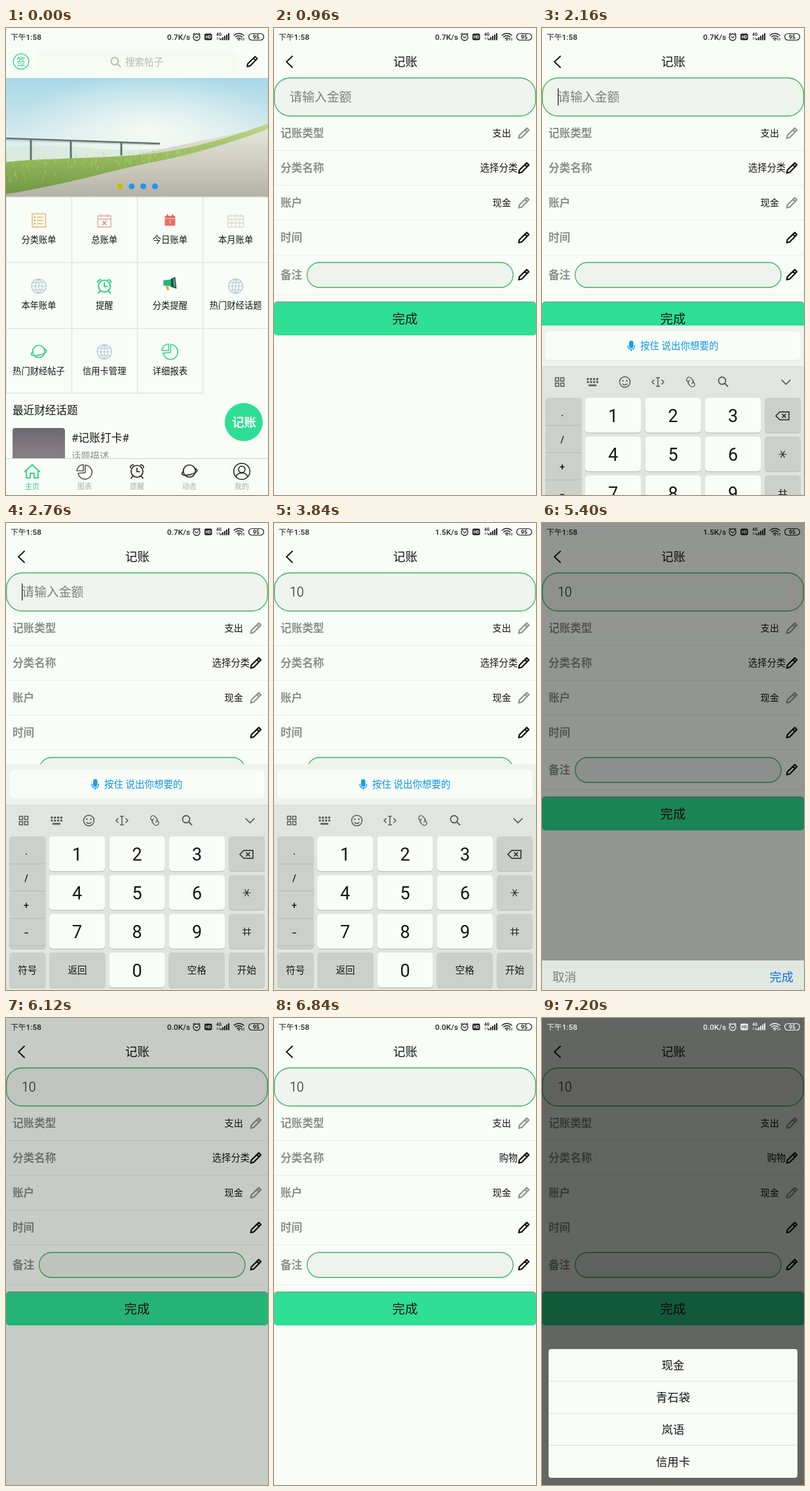
An HTML page that plays this animation: 400x711 px, repeating every 8 s.

```html
<!DOCTYPE html>
<html lang="zh">
<head>
<meta charset="utf-8">
<style>
html, body { margin: 0; width: 100%; height: 100%; overflow: hidden; background: #f8fdf7; }
svg { display: block; font-family: Roboto, "Noto Sans CJK SC", "Noto Sans CJK", sans-serif; }
</style>
</head>
<body>
<svg id="stage" width="400" height="711" viewBox="0 0 400 711"></svg>
<script>
const BG = '#f8fdf7', GREEN = '#2edf94', INK = '#141614', MINT = '#2fd08c';

// --- drawing helpers; text is placed by its vertical middle ---
const text = (s, x, cy, size, fill = INK, anchor = 'middle', extra = '') =>
  `<text x="${x}" y="${cy + size * 0.37}" font-size="${size}" fill="${fill}" text-anchor="${anchor}" ${extra}>${s}</text>`;
const rect = (x, y, w, h, fill, r = 0, extra = '') =>
  `<rect x="${x}" y="${y}" width="${w}" height="${h}" rx="${r}" fill="${fill}" ${extra}/>`;
const line = (d, color, w = 1.5, extra = '') =>
  `<path d="${d}" fill="none" stroke="${color}" stroke-width="${w}" ${extra}/>`;
const disc = (x, y, r, fill, extra = '') => `<circle cx="${x}" cy="${y}" r="${r}" fill="${fill}" ${extra}/>`;
const ring = (x, y, r, color, w = 1.5) => disc(x, y, r, 'none', `stroke="${color}" stroke-width="${w}"`);
const at = (x, y, body, more = '') => `<g transform="translate(${x} ${y}) ${more}">${body}</g>`;
const range = n => [...Array(n).keys()];
const BOLD = 'font-weight="700"', MEDIUM = 'font-weight="500"';

// --- icons, each around its own centre ---
const pencil = (x, y, color, w = 1.8) => at(x, y,
  line('M-7.8 7.8L-6.8 3.2L4.4-7.6L7.6-4.4L-3.4 6.8ZM1.6-4.9L4.8-1.7', color, w, 'stroke-linejoin="round"'));
const globe = (x, y) => at(x, y, ring(0, 0, 11, '#a9c6de', 1.2) +
  line('M-11 0H11M-9.5-5.5H9.5M-9.5 5.5H9.5', '#c6c8bd', 1.1) +
  line('M0-11V11M0-11C-7-6-7 6 0 11C7 6 7-6 0-11', '#a9c6de', 1.1));
const alarm = (x, y, color, w = 2) => at(x, y, ring(0, 0, 9, color, w) +
  line('M0-5V0.5H4M-6.5 7.5L-9 10.5M6.5 7.5L9 10.5M-10-5.5Q-10.5-9.5-5.5-9.8M10-5.5Q10.5-9.5 5.5-9.8', color, w, 'stroke-linecap="round"'));
const planet = (x, y, color) => at(x, y, ring(0, -0.5, 9.3, color, 1.6) +
  line('M-9-2.5C-16 2.5-9 5 0 5S16 2.5 9-2.5', color, 1.6, 'stroke-linecap="round" transform="rotate(-14)"'));
const pie = (x, y, color, k = 1) => at(x, y,
  line('M1-11A11.3 11.3 0 1 1-10.5 2L1 1ZM-2-12V-2H-12.5A11 11 0 0 1-2-12Z', color, 1.5, 'stroke-linejoin="round"'), `scale(${k})`);
const search = (x, y, color, w = 1.8) => at(x, y,
  ring(-1, -1, 5.5, color, w) + line('M3 3L7.5 7.5', color, w, 'stroke-linecap="round"'));

const gridIcons = [
  (x, y) => at(x, y, line('M-10-10H10.5V10H-10Z', '#f1b768') +
    line('M-3-5H7M-3 0H7M-3 5H7', '#f1b768', 1.4) + line('M-7-5H-5M-7 0H-5M-7 5H-5', '#ee8c55', 2)),
  (x, y) => at(x, y, line('M-10-7H10V10H-10ZM-10-2H10M-5-10V-5M5-10V-5', '#e5a9a0', 1.3) +
    line('M-3 1L3 7M3 1L-3 7', '#dd7f76', 1.3)),
  (x, y) => at(x, y, rect(-8, -7, 16, 15, '#e86f66', 1.5) + line('M-8-3H8', '#f8d8d2', 1) +
    line('M-4-9V-5M4-9V-5', '#d8584f', 2) + text('1', 0, 2.5, 8, '#fff')),
  (x, y) => at(x, y, line('M-12-7H12V10H-12ZM-12-2H12M-12 4H12M-6-2V10M0-2V10M6-2V10M-8-10V-5M0-10V-5M8-10V-5', '#ddd8cf', 1.3)),
  globe,
  (x, y) => alarm(x, y, MINT),
  (x, y) => at(x, y, '<path d="M-9-6L2-7V3L-9 2Z" fill="#22b47d"/><path d="M2-8L9-11L11 7L2 4Z" fill="#2c4c48"/><path d="M-6 2L-2 3L0 9H-4Z" fill="#e0ad3c"/>' +
    line('M7-8L8 4', '#2fd08c', 2), 'translate(-1 -3)'),
  globe,
  (x, y) => planet(x, y, MINT),
  globe,
  (x, y) => pie(x, y, MINT)
];
const gridLabels = '分类账单 总账单 今日账单 本月账单 本年账单 提醒 分类提醒 热门财经话题 热门财经帖子 信用卡管理 详细报表'.split(' ');

function banner() {
  let seed = 7;
  const rnd = () => (seed = seed * 16807 % 2147483647) / 2147483647;
  const blades = range(160).map(() => {
    const x = rnd() * 300, y = 204 - x * 0.06 + rnd() * (38 - x * 0.1);
    return `M${x.toFixed(1)} ${y.toFixed(1)}l${(rnd() * 4 - 2).toFixed(1)} ${(-3 - rnd() * 5).toFixed(1)}`;
  }).join('');
  return `<g clip-path="url(#photo)">` + rect(0, 76, 400, 181, 'url(#sky)') + rect(0, 76, 400, 181, 'url(#glow)') +
    '<path d="M0 182Q60 176 130 183T300 178V210H0Z" fill="#d3e6d8" opacity=".6"/>' +
    '<path d="M0 257V235L400 150V257Z" fill="url(#road)"/>' +
    line('M0 168L235 176', '#5f726e', 2.4) + line('M0 171L235 178', '#a8b9b2', 1) +
    line('M38 169V203M99 171V200M176 174V194', '#5f726e', 3) +
    '<path d="M0 204C60 198 130 199 205 193S340 166 400 146V154C350 172 296 190 230 203S90 239 0 253Z" fill="url(#grass)"/>' +
    line(blades, '#b5d377', 1, 'opacity=".6"') +
    '</g>' + range(4).map(i => disc(174 + i * 17.8, 241, 4.5, i ? '#2196f3' : '#c9b80c')).join('');
}

function home() {
  const cells = gridLabels.map((label, i) => {
    const x = 50 + i % 4 * 100.2, y = 257 + Math.floor(i / 4) * 100;
    return gridIcons[i](x, y + 36) + text(label, x, y + 65, 13.3);
  }).join('');
  const tabs = ['主页', '图表', '提醒', '动态', '我的'].map((s, i) =>
    text(s, 40 + i * 80, 698, 11, i ? '#a9ada8' : MINT)).join('');
  return rect(0, 0, 400, 711, BG) +
    ring(23, 51, 11.7, MINT, 1.3) + text('签', 23, 51, 14, MINT) +
    rect(47, 36, 305, 31, '#f7faf1', 3) + search(167, 51.5, '#b9bcb6', 2) + text('搜索帖子', 211, 52, 14.4, '#b6bab4') +
    pencil(376, 51, '#111', 2) + banner() +
    line('M0 257.5H400M0 357H400M0 457.5H400M0 556H301M100.5 257V556M200.5 257V556M300.5 257V556M.5 257V556', '#dfe6e4', 1.5) +
    cells + text('最近财经话题', 10, 582, 16.6, INK, 'start') +
    rect(10, 609, 80, 70, 'url(#thumb)', 4) + text('#记账打卡#', 100, 624, 16.8, INK, 'start') +
    text('话题描述', 100, 652, 14.3, '#8e928d', 'start') +
    `<g id="fab">${disc(363, 600, 29, '#2ede94')}${text('记账', 363.5, 600, 18.6, '#f8fdf7', 'middle', BOLD)}</g>` +
    rect(0, 656, 400, 55, BG) + line('M0 655.5H400', '#cfd4cf', 1) +
    line('M28 676L40 665L52 676M31 674V685H37V678H43V685H49V674', MINT, 1.8, 'stroke-linejoin="round"') +
    pie(120, 676, '#444', 0.95) + alarm(200, 675, '#222', 1.7) + planet(280, 675, '#222') +
    ring(360, 675, 12.3, '#222') + ring(360, 672, 5, '#222') + line('M351 683Q353 677.5 360 677.5T369 683', '#222') + tabs;
}

function record() {
  const labels = ['记账类型', '分类名称', '账户', '时间', '备注'];
  const rowY = [160, 213, 266, 319, 375.5];
  const rows = labels.map((s, i) => text(s, 10, rowY[i], 16.6, '#8b908a', 'start', BOLD) +
    pencil(381.5, rowY[i], i % 2 || i == 4 ? '#111' : '#8f948e', 2.2)).join('');
  const box = 'stroke="#3cb562" stroke-width="1.3"';
  return rect(0, 0, 400, 711, BG) + line('M28.5 42.5L19 51.5L28.5 60.5', '#111', 1.8) +
    text('记账', 200.5, 51, 18.6, INK, 'middle', MEDIUM) +
    rect(0.6, 76, 398.8, 58, '#f0f4ee', 24, box) +
    text('请输入金额', 24, 105, 18.9, '#7b807a', 'start', 'id="hint"') +
    text('', 24, 105, 19.5, INK, 'start', 'id="amount" font-weight="300"') +
    rect(24, 92, 1.3, 26, '#222', 0, 'id="caret"') +
    line('M0 186.5H400M0 239.5H400M0 292.5H400M0 345.5H400M0 406H400', '#e8ede7', 1.2) + rows +
    text('支出', 362, 160, 14.2, INK, 'end') + text('', 372, 213, 14.3, INK, 'end', 'id="kind"') +
    text('现金', 362, 266, 14.2, INK, 'end') +
    rect(50.6, 357, 314.4, 38, '#eff3ed', 19, box) +
    rect(0, 416.5, 400, 51.5, '#5fa888', 5) + rect(0, 418, 400, 50, GREEN, 5) +
    text('完成', 200, 442.5, 19.4, INK);
}

function keyboard() {
  const GREY = '#cbd0cb', ICON = '#555a56', colX = [66, 157.7, 249];
  const key = (x, y, w, fill, body, id = '') => rect(x, y + 1.2, w, 53, '#bcc1bc', 5) + rect(x, y, w, 53, fill, 5, id) + body;
  const digit = (n, c, r) => {
    const y = 477 + r * 59;
    return key(colX[c], y, 85, BG, text(n, colX[c] + 42.5, y + 27, 27), `id="key${n}"`);
  };
  const digits = range(9).map(i => digit(i + 1, i % 3, Math.floor(i / 3))).join('') + digit(0, 1, 3);
  const side = ['.', '/', '+', '−'].map((s, i) => text(s, 31, 499.5 + i * 41.3, 14, INK, 'middle', MEDIUM)).join('');
  const word = (s, x, w) => key(x, 654, w, GREY, text(s, x + w / 2, 681, 14.5));
  return rect(0, 367, 400, 62, '#eff3ee') + rect(5, 376, 390, 43, BG, 7) +
    rect(133, 390, 6.5, 11.5, '#169bf0', 3.2) + line('M131 397Q131 403.5 136.3 403.5T141.5 397M136.3 403.5V406', '#169bf0', 1.4) +
    text('按住 说出你想要的', 150, 398, 14.5, '#1295ee', 'start') +
    rect(0, 429, 400, 282, '#e0e5e0') + line('M0 429.5H400', '#d3d8d3', 1) +
    line('M20.5 446.5h5v5h-5zM28.5 446.5h5v5h-5zM20.5 454.5h5v5h-5zM28.5 454.5h5v5h-5z', ICON) +
    line('M68.5 448.5H86M68.5 453H86', ICON, 3, 'stroke-dasharray="3 1.8"') + line('M71 458H83', ICON, 2.6) +
    ring(126.5, 453, 8, ICON) + disc(123.5, 451, 1.2, ICON) + disc(129.5, 451, 1.2, ICON) + line('M122.5 455.5Q126.5 459.5 130.5 455.5', ICON) +
    line('M177 447V459M174 446.5H180M174 459.5H180M171.5 449.5L168 453L171.5 456.5M182.5 449.5L186 453L182.5 456.5', ICON) +
    at(227, 453, line('M-1 3H-5A4 4 0 0 1-5-5H0A4 4 0 0 1 3 1M1-3H5A4 4 0 0 1 5 5H0A4 4 0 0 1-3-1', ICON), 'rotate(45) scale(.9)') +
    search(276, 452, ICON) + line('M365.5 449.5L372.5 456.5L379.5 449.5', ICON, 1.7) +
    rect(5, 478.2, 55.5, 171, '#bcc1bc', 5) + rect(5, 477, 55.5, 171, GREY, 5) +
    line('M5 519H60M5 560.5H60M5 602H60M5 643.5H60', '#b6bbb6', 1) + side + digits +
    key(340, 477, 55, GREY, line('M357 504.5L363 498.5H377V510.5H363ZM366.5 501.5L372.5 507.5M372.5 501.5L366.5 507.5', '#222')) +
    key(340, 536, 55, GREY, line('M361.5 563H373.5M364.5 557.8L370.5 568.2M370.5 557.8L364.5 568.2', '#222', 1.2)) +
    key(340, 595, 55, GREY, line('M364.5 616V628M370.5 616V628M361 619.5H374M361 624.5H374', '#222', 1.2)) +
    word('符号', 5, 55.5) + word('返回', 66, 86) + word('空格', 248.5, 85.5) + word('开始', 340, 55);
}

const picker = () => rect(0, 0, 400, 45, '#e1e7e1') + rect(0, 45, 400, 200, '#d3d8d3') +
  text('取消', 16, 25, 18.2, '#7b807b', 'start') + text('完成', 384, 25, 18.2, '#0b72e0', 'end') +
  line('M0 127H400M0 163H400', '#aeb3ae', 1) +
  `<g id="wheel">${text('选择分类', 200, 145, 18)}${text('购物', 200, 181, 18)}</g>`;

const actions = () => rect(10, 504, 380, 196, BG, 4) + line('M10 553H390M10 602H390M10 650.5H390', '#d9ded8', 1) +
  ['现金', '青石袋', '岚语', '信用卡'].map((s, i) => text(s, 200, 529 + i * 49, 17.4)).join('');

const status = speedId => {
  const C = 'currentColor';
  return text('下午1:58', 7, 13.5, 11.8, C, 'start', MEDIUM) + text('', 281, 13.5, 11.8, C, 'end', `id="${speedId}" ${MEDIUM}`) +
    ring(291, 14, 5, C, 1.3) + line('M288.5 13L291 15L293.5 13M285.5 10L288 7.8M296.5 10L294 7.8', C, 1.2) +
    rect(303, 8.5, 11.5, 10, C, 2) + text('HD', 308.8, 13.6, 6.5, 'var(--hole)', 'middle', BOLD) +
    text('4G', 325, 9.5, 6.3, C, 'middle', BOLD) + line('M322.5 14V18M325.5 14V18', C, 1, 'opacity=".7"') +
    range(5).map(i => rect(327 + i * 3, 16 - i * 2, 2, 2.5 + i * 2, C)).join('') +
    line('M347.5 11.5Q355.5 5 363.5 11.5M350 14Q355.5 9.5 361 14M352.5 16.5Q355.5 14 358.5 16.5', C, 1.5) +
    disc(355.5, 18, 1.2, C) + line('M360 15V19M363 15V19', C, 1) +
    rect(370.5, 8.5, 23, 10, 'none', 5, 'stroke="currentColor" stroke-width="1.2"') + text('95', 382, 13.6, 8.5, C, 'middle', BOLD);
};

const gradient = (id, stops, dir = 'x2="0" y2="1"') => `<linearGradient id="${id}" ${dir}>` +
  stops.map((c, i) => `<stop offset="${i / (stops.length - 1)}" stop-color="${c}"/>`).join('') + '</linearGradient>';

const layer = (id, body) => `<g id="${id}">${body}</g>`;
document.getElementById('stage').innerHTML = '<defs>' +
  gradient('sky', ['#a9d8e8', '#c6e4ec', '#e6f2ee', '#f1f5ea']) +
  gradient('grass', ['#c3d68c', '#93b75a', '#6f9745']) +
  gradient('road', ['#e6e6da', '#cfcec1', '#b4b2a4']) +
  gradient('thumb', ['#6c6870', '#857c82', '#8d8387']) +
  '<radialGradient id="glow" cx=".55" cy=".45" r=".5"><stop stop-color="#fbfdf4" stop-opacity=".85"/><stop offset="1" stop-color="#fbfdf4" stop-opacity="0"/></radialGradient>' +
  '<clipPath id="photo"><path d="M0 76H400V257H0Z"/></clipPath></defs>' +
  layer('home', home()) + layer('record', record()) + layer('keyboard', keyboard()) +
  layer('status', status('speed')) + rect(0, 0, 400, 711, '#000', 0, 'id="dim"') +
  layer('picker', picker()) + layer('actions', actions()) + layer('lightStatus', status('lightSpeed'));

// --- animation ---
const $ = id => document.getElementById(id);
const ease = p => 1 - (1 - p) ** 2;
// Eased value through [time, value] points
function track(t, ...points) {
  const i = points.findIndex(p => p[0] > t);
  if (i < 0) return points[points.length - 1][1];
  if (!i) return points[0][1];
  const [a, va] = points[i - 1], [b, vb] = points[i];
  return va + (vb - va) * ease((t - a) / (b - a));
}
const move = (id, x, y) => $(id).setAttribute('transform', `translate(${x} ${y})`);
const show = (id, on) => $(id).setAttribute('visibility', on ? 'visible' : 'hidden');
const within = (t, a, b) => t >= a && t < b;

const FOCUS = 1680, KEY1 = 2880, KEY0 = 3240;
$('status').style.cssText = `color:#222;--hole:${BG}`;
$('lightStatus').style.cssText = 'color:#eef2ed;--hole:#62645f';

function draw(t) {
  $('fab').setAttribute('opacity', within(t, 120, 360) ? 0.5 : 1);
  move('record', track(t, [360, 400], [840, 0]), 0);

  const amount = t < KEY1 ? '' : t < KEY0 ? '1' : '10';
  $('amount').textContent = amount;
  show('hint', !amount);
  const since = t - (t < KEY1 ? FOCUS : t < KEY0 ? KEY1 : KEY0);
  show('caret', within(t, FOCUS, 5040) && since % 1000 < 500);
  $('caret').setAttribute('x', 24 + amount.length * 11);
  $('kind').textContent = t < 6240 ? '选择分类' : '购物';

  move('keyboard', 0, track(t, [1920, 344], [2400, 0], [3840, 0], [4200, 344]));
  $('key1').setAttribute('fill', within(t, KEY1, KEY1 + 120) ? '#d5dad5' : BG);
  $('key0').setAttribute('fill', within(t, KEY0, KEY0 + 120) ? '#d5dad5' : BG);

  $('dim').setAttribute('opacity', track(t, [5399, 0], [5400, 0.41], [5520, 0.5], [6119, 0.5], [6120, 0.2],
    [6240, 0], [6840, 0], [7200, 0.6]));
  move('picker', 0, track(t, [5399, 711], [5400, 666], [5640, 466], [6119, 466], [6120, 711]));
  move('wheel', 0, track(t, [5640, 0], [5880, -36]));
  move('actions', 0, track(t, [6840, 207], [7200, 0]));

  const speed = t < 3480 ? '0.7K/s' : t < 5880 ? '1.5K/s' : '0.0K/s';
  $('speed').textContent = $('lightSpeed').textContent = speed;
  show('status', t < 6960);
  show('lightStatus', t >= 6960);
}

// The screen refreshes every 120 ms
function frame() {
  draw(Math.floor((performance.now() % 8000 + 8) / 120) * 120);
  requestAnimationFrame(frame);
}
frame();
</script>
</body>
</html>
```
